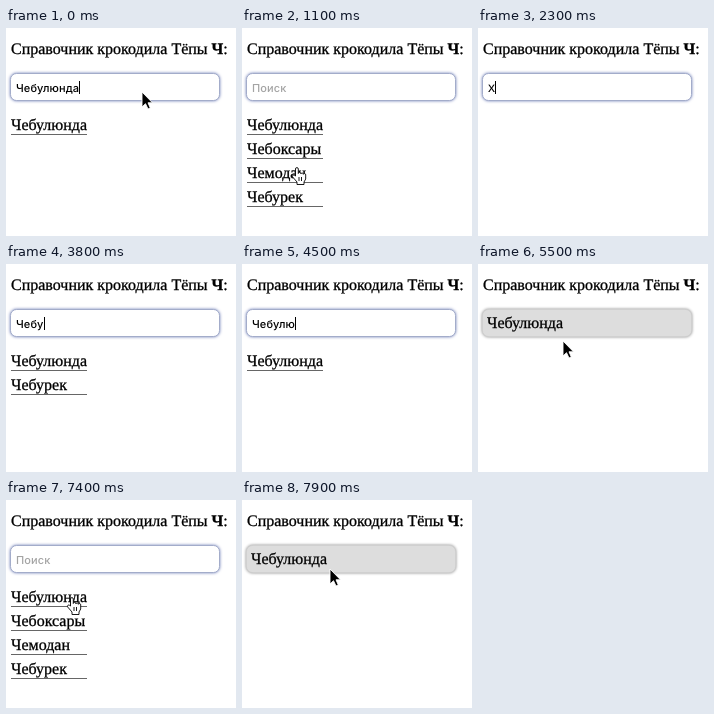
Write an HTML page that moves like this. It is 230x208 px and loops after 8000 ms.

```html
<!DOCTYPE html>
<html lang="ru">
<head>
<meta charset="utf-8">
<style>
  html, body { margin: 0; width: 100%; height: 100%; overflow: hidden; background: #fff; }
  svg { display: block; }
  text { font: 16px "Liberation Serif", serif; stroke: #000; stroke-width: .3; text-rendering: geometricPrecision; }
  #field { fill: #fff; stroke: #a3acca; filter: drop-shadow(0 0 1.5px #6f7fb8); }
  #field.picked { fill: #ddd; stroke: #d0d0d0; filter: drop-shadow(0 0 1.5px #888); }
  #value { font: 500 11px Inter, sans-serif; stroke: none; letter-spacing: .1px; }
  #value.latin { font: 14px "Liberation Sans", sans-serif; }
  #value.hint { fill: #a4a4a4; }
  #value.picked { font: 16px "Liberation Serif", serif; stroke: #000; letter-spacing: 0; }
  #list path { stroke: #666; }
  #arrow { fill: #000; stroke: #fff; }
  #hand { fill: #fff; stroke: #000; }
</style>
</head>
<body>
<svg width="230" height="208" viewBox="0 0 230 208">
  <text x="5" y="26">Справочник крокодила Тёпы <tspan font-weight="bold">Ч</tspan>:</text>
  <rect id="field" x="4.5" y="45.5" width="209" height="27" rx="6"/>
  <text id="value"></text>
  <path id="caret" d="M.5 53v13" stroke="#000"/>
  <g id="list"></g>
  <g id="pointer" stroke-width=".9" stroke-linejoin="round">
    <path id="arrow" d="M0 0V15L3.5 11.7 6 17 8.3 16 6 10.8H10.5Z"/>
    <path id="hand" d="M-1.5 8V1a1.4 1.4 0 0 1 2.8 0V5.5a1.3 1.3 0 0 1 2.6.3a1.3 1.3 0 0 1 2.5.5a1.2 1.2 0 0 1 2.3.6V11L7 14v2.5H0V14L-4.5 8.8a1.3 1.3 0 0 1 2-1.5ZM2 9v4M4.5 9v4"/>
  </g>
</svg>
<script>
const LOOP = 8000;
const words = ["Чебулюнда", "Чебоксары", "Чемодан", "Чебурек"];

// [time, text, picked]: what the field holds from that moment on
const states = [
  [0, "Чебулюнда"], [100, "Чебулю"], [200, "Чебу"], [300, "Ч"], [400, ""],
  [1200, "Чемодан", true], [1500, "Чемодан"], [1800, "Чемода"], [2000, "Чем"], [2100, ""],
  [2300, "x"], [2600, ""],
  [2900, "Ч"], [3100, "Че"], [3400, "Чеб"], [3700, "Чебу"], [4100, "Чебул"], [4300, "Чебулю"],
  [5100, "Чебулюнда", true], [6100, "Чебулюнда"], [6400, "Чебу"], [6500, ""],
  [7500, "Чебулюнда", true],
];

// Each visible stretch of the pointer: [time, x, y]
const routes = [
  [[0, 136, 64], [100, 136, 64]],
  [[800, 118, 92], [1100, 55, 140], [1200, 55, 140], [1450, 102, 51], [1800, 102, 51]],
  [[4700, 112, 88], [4950, 64, 97], [5150, 64, 97], [5550, 86, 76], [6000, 106, 60],
   [6350, 106, 60], [6600, 59, 90], [6900, 66, 168], [7100, 58, 148], [7400, 66, 98],
   [7550, 66, 98], [7850, 88, 69], [8000, 88, 69]],
];

const caretOff = [[600, 1200], [7000, 7500]];

const $ = id => document.getElementById(id);
const field = $("field"), value = $("value"), caret = $("caret"), list = $("list");
const pointer = $("pointer"), arrow = $("arrow"), hand = $("hand");

const rows = words.map(() => {
  list.insertAdjacentHTML("beforeend", '<g><text x="5"></text><path d="M5 4.5h76"/></g>');
  return list.lastElementChild;
});

const show = (el, on) => el.setAttribute("visibility", on ? "visible" : "hidden");
const within = (t, [from, to]) => t >= from && t < to;

function pointerAt(t) {
  const route = routes.find(r => within(t, [r[0][0], r.at(-1)[0]]));
  if (!route) return null;
  const i = route.findIndex(p => p[0] > t);
  const [t0, x0, y0] = route[i - 1], [t1, x1, y1] = route[i];
  const k = (t - t0) / (t1 - t0), ease = k * k * (3 - 2 * k);
  return [x0 + (x1 - x0) * ease, y0 + (y1 - y0) * ease];
}

function draw(t) {
  const [, text, picked] = states.findLast(s => s[0] <= t);
  const matches = picked ? [] : words.filter(w => w.startsWith(text));

  field.setAttribute("class", picked ? "picked" : "");
  value.setAttribute("class", picked ? "picked" : text === "x" ? "latin" : text ? "" : "hint");
  value.setAttribute("x", picked ? 9 : 10);
  value.setAttribute("y", picked || text === "x" ? 64 : 63.5);
  value.textContent = text || "Поиск";

  show(caret, !picked && !caretOff.some(span => within(t, span)));
  const caretX = text ? Math.round(10 + value.getComputedTextLength()) : 10;
  caret.setAttribute("transform", `translate(${caretX})`);

  rows.forEach((row, i) => {
    show(row, i < matches.length);
    row.setAttribute("transform", `translate(0 ${102 + 24 * i})`);
    row.firstChild.textContent = matches[i] || "";
  });

  const at = pointerAt(t);
  show(pointer, at);
  if (at) {
    const [x, y] = at.map(Math.round);
    const overWord = x < 81 && matches.some((_, i) => y > 91 + 24 * i && y < 107 + 24 * i);
    pointer.setAttribute("transform", `translate(${x} ${y})`);
    arrow.style.display = overWord ? "none" : "";
    hand.style.display = overWord ? "" : "none";
  }
}

const start = performance.now();
function tick() {
  draw((performance.now() - start) % LOOP);
  requestAnimationFrame(tick);
}
tick();
</script>
</body>
</html>
```
